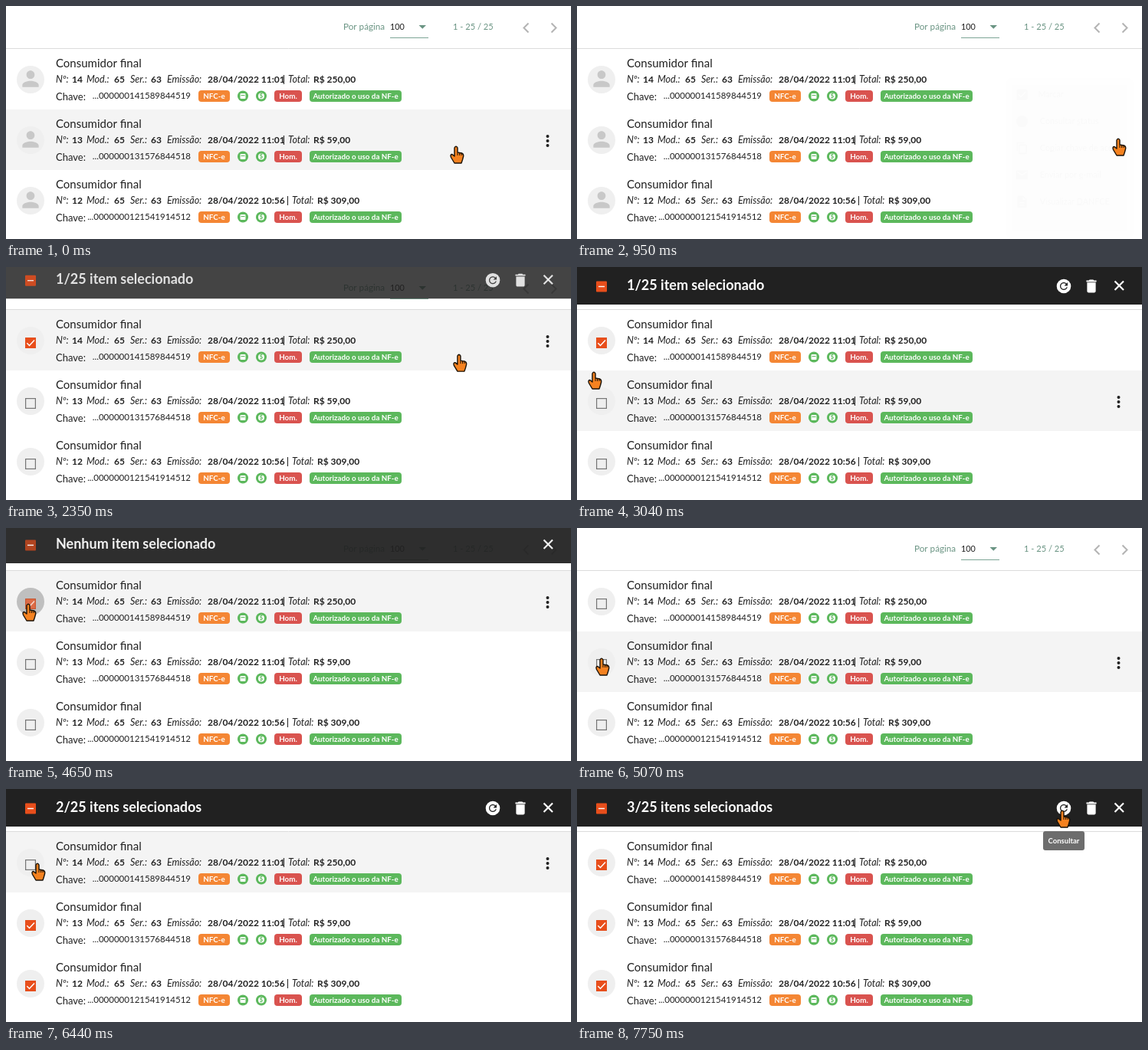
Recreate the animation shown at these times as an HTML page with a canvas. Size 737 by 304 pixels, loop 9070 ms.

```html
<!DOCTYPE html>
<html lang="pt-BR">
<head>
<meta charset="utf-8">
<style>
html, body { margin: 0; width: 100%; height: 100%; overflow: hidden; background: #fff; }
canvas { display: block; }
</style>
</head>
<body>
<canvas id="stage" width="737" height="304"></canvas>
<script>
const ctx = document.getElementById('stage').getContext('2d');
const LOOP = 9070, PITCH = 79;
const ORANGE = '#e84e1b', GREEN = '#5cb85c', INK = '#212121';

const rows = [
  { no: '14', date: '28/04/2022 11:01', total: 'R$ 250,00', key: '...000000141589844519', shift: 0 },
  { no: '13', date: '28/04/2022 11:01', total: 'R$ 59,00', key: '...000000131576844518', shift: 0 },
  { no: '12', date: '28/04/2022 10:56', total: 'R$ 309,00', key: '...0000000121541914512', shift: 5 }
];

// Each toggle: time, row, new value
const toggles = [[2200, 0, 1], [4520, 0, 0], [5130, 1, 1], [5760, 2, 1], [6650, 0, 1]];

// Pointer tip: time, x, y
const track = [
  [330, 587, 183], [750, 706, 173], [1250, 706, 173], [1620, 650, 108], [2200, 644, 112],
  [3040, 22, 137], [3110, 22, 137], [3590, 30, 98], [3910, 30, 98], [3920, 29, 99],
  [4660, 29, 99], [4980, 32, 170], [5190, 32, 170], [5480, 33, 236], [5640, 32, 250],
  [5850, 32, 250], [6440, 41, 97], [6560, 34, 97], [6740, 34, 97], [7330, 594, 30], [7600, 633, 28]
];

const icons = {
  person: 'M12 12c2.21 0 4-1.79 4-4s-1.79-4-4-4-4 1.79-4 4 1.79 4 4 4zm0 2c-2.67 0-8 1.34-8 4v2h16v-2c0-2.66-5.33-4-8-4z',
  refresh: 'M17.65 6.35C16.2 4.9 14.21 4 12 4c-4.42 0-7.99 3.58-7.99 8s3.57 8 7.99 8c3.73 0 6.84-2.55 7.73-6h-2.08c-.82 2.33-3.04 4-5.65 4-3.31 0-6-2.69-6-6s2.69-6 6-6c1.66 0 3.14.69 4.22 1.78L13 11h7V4z',
  trash: 'M6 19c0 1.1.9 2 2 2h8c1.1 0 2-.9 2-2V7H6zM19 4h-3.5l-1-1h-5l-1 1H5v2h14z',
  check: 'M19 3H5c-1.1 0-2 .9-2 2v14c0 1.1.9 2 2 2h14c1.1 0 2-.9 2-2V5c0-1.1-.9-2-2-2zm-9 14l-5-5 1.41-1.41L10 14.17l7.59-7.59L19 8z',
  copy: 'M16 1H4c-1.1 0-2 .9-2 2v14h2V3h12zm3 4H8c-1.1 0-2 .9-2 2v14c0 1.1.9 2 2 2h11c1.1 0 2-.9 2-2V7c0-1.1-.9-2-2-2zm0 16H8V7h11z',
  mail: 'M20 4H4c-1.1 0-2 .9-2 2v12c0 1.1.9 2 2 2h16c1.1 0 2-.9 2-2V6c0-1.1-.9-2-2-2zm0 4l-8 5-8-5V6l8 5 8-5z',
  file: 'M14 2H6c-1.1 0-2 .9-2 2v16c0 1.1.9 2 2 2h12c1.1 0 2-.9 2-2V8zm-1 7V3.5L18.5 9zM8 13v2h8v-2zm0 4v2h8v-2z',
  hand: 'M-2 2Q0-1.8 2 2V8L7.5 9Q10 10 9.7 13L8.5 17.5 7 22H-2L-6.5 14.5Q-8 10.5-5 10.5L-2 13Z'
};
for (const name in icons) icons[name] = new Path2D(icons[name]);

const menuItems = [
  ['check', 'Marcar', ''], ['refresh', 'Consultar status', 's', 10], ['copy', 'Copiar chave de acesso', 'p', 2],
  ['mail', 'Enviar por e-mail', 'e', 11], ['file', 'Visualizar DANFCE', 'D', 11]
];

const clamp = v => Math.max(0, Math.min(1, v));
const span = (t, start, length) => clamp((t - start) / length);
const easeOut = u => 1 - (1 - u) ** 3;

function text(str, x, y, size, color = INK, style = '', align = 'left') {
  ctx.font = `${style} ${size}px Lato, sans-serif`;
  ctx.fillStyle = color;
  ctx.textAlign = align;
  ctx.fillText(str, x, y);
}
function box(x, y, w, h, color, radius = 0) {
  ctx.fillStyle = color;
  ctx.beginPath();
  ctx.roundRect(x, y, w, h, radius);
  ctx.fill();
}
function disc(x, y, r, color) {
  ctx.fillStyle = color;
  ctx.beginPath();
  ctx.arc(x, y, r, 0, 7);
  ctx.fill();
}
function line(color, width, ...points) {
  ctx.strokeStyle = color;
  ctx.lineWidth = width;
  ctx.beginPath();
  for (let i = 0; i < points.length; i += 2) ctx.lineTo(points[i], points[i + 1]);
  ctx.stroke();
}
function icon(name, cx, cy, size, color) {
  ctx.save();
  ctx.translate(cx - size / 2, cy - size / 2);
  ctx.scale(size / 24, size / 24);
  ctx.fillStyle = color;
  ctx.fill(icons[name], 'evenodd');
  ctx.restore();
}
function faded(alpha, draw) {
  if (alpha <= 0) return;
  ctx.save();
  ctx.globalAlpha *= alpha;
  draw();
  ctx.restore();
}

function pointerAt(t) {
  const next = track.findIndex(k => k[0] > t);
  if (next === 0) return track[0].slice(1);
  if (next < 0) return track.at(-1).slice(1);
  const [t0, x0, y0] = track[next - 1], [t1, x1, y1] = track[next];
  const u = span(t, t0, t1 - t0), s = u * u * (3 - 2 * u);
  return [x0 + (x1 - x0) * s, y0 + (y1 - y0) * s];
}
function lastToggle(t, row) {
  return toggles.findLast(k => k[0] <= t && k[1] === row);
}
function checkedAmount(t, row) {
  const last = lastToggle(t, row);
  if (!last) return 0;
  return last[2] ? span(t, last[0], 120) : 1 - span(t, last[0], 300) ** 1.6;
}
function barAmount(t) {
  if (t < 4520) return easeOut(span(t, 2200, 330));
  if (t < 5130) return 1 - span(t, 4520, 330) ** 3;
  return easeOut(span(t, 5130, 450));
}

function paginator() {
  const green = '#6a9483';
  text('Por página', 440, 31, 11.7, green);
  text('100', 501, 31, 10.8, INK);
  line('#7da596', 1, 501, 41.5, 551, 41.5);
  ctx.fillStyle = green;
  ctx.fill(new Path2D('M538.5 25h9.5l-4.75 4.8z'));
  text('1 - 25 / 25', 583, 31, 11.1, green);
  line('#b4b4b4', 2, 681.5, 22.5, 675.5, 28.5, 681.5, 34.5);
  line('#b4b4b4', 2, 711.5, 22.5, 717.5, 28.5, 711.5, 34.5);
  line('#dcdcdc', 1, 0, 55.5, 737, 55.5);
}

function badge(label, x, width, color) {
  box(x, 110, width, 15, color, 4);
  text(label, x + width / 2, 121, 9.8, '#fff', 'bold', 'center');
}

function avatar(t, row) {
  disc(32, 96, 18, '#efefef');
  if (t < 2200) return icon('person', 32, 95, 32, '#c8c8c8');
  const last = lastToggle(t, row);
  if (last && last[0] > 2200) {
    const age = t - last[0];
    faded(0.2 * (1 - span(age, 130, 250)), () => disc(32, 96, 18 * easeOut(span(age, 0, 130)), '#000'));
  }
  ctx.strokeStyle = '#757575';
  ctx.lineWidth = 1.2;
  ctx.strokeRect(25.6, 92.6, 12.8, 12.8);
  faded(checkedAmount(t, row), () => {
    box(25, 92, 14, 14, ORANGE, 1);
    line('#fff', 1.5, 27.3, 99.3, 30.5, 102.5, 37, 95.5);
  });
}

function drawRow(t, row, hovered) {
  const { no, date, total, key, shift } = rows[row];
  ctx.save();
  ctx.translate(0, row * PITCH);
  if (hovered) box(0, 56, 737, 79, '#f4f4f4');
  avatar(t, row);
  text('Consumidor final', 65, 80, 15);
  for (const [label, x] of [['Nº:', 65], ['Mod.:', 105], ['Ser.:', 162], ['Emissão:', 210], ['Total:', 368 + shift]])
    text(label, x, 100, 12.5, INK, 'italic');
  for (const [value, x] of [[no, 86], ['65', 141], ['63', 189], [date, 263], [total, 401 + shift]])
    text(value, x, 100, 12, INK, 'bold');
  line(INK, 1, 362.5 + shift, 90, 362.5 + shift, 102);
  text('Chave:', 65, 123, 13);
  text(key, 241, 121, 11.5, INK, '', 'right');
  badge('NFC-e', 251, 41, '#f48634');
  disc(309, 117.5, 7, GREEN);
  box(305.5, 114, 7, 7, '#fff', 1);
  box(306.5, 116, 5, 1, GREEN);
  disc(333, 117.5, 7, GREEN);
  disc(333, 117.5, 4, '#fff');
  text('$', 333, 120.3, 7.5, GREEN, 'bold', 'center');
  badge('Hom.', 350, 36, '#d9534f');
  badge('Autorizado o uso da NF-e', 396, 120, GREEN);
  if (hovered) for (const y of [91, 97, 103]) disc(706.5, y, 2, INK);
  ctx.restore();
}

function drawBar(t) {
  const amount = barAmount(t);
  const count = rows.filter((_, row) => lastToggle(t, row)?.[2]).length;
  const plural = count > 1 ? 'itens selecionados' : 'item selecionado';
  faded(amount, () => {
    ctx.translate(0, -49 * (1 - amount));
    box(0, 0, 737, 49, INK);
    faded(count ? 1 : 0.75, () => box(25, 18.5, 14, 14, ORANGE, 1));
    line('#fff', 1.4, 28, 25.5, 36, 25.5);
    text(count ? `${count}/25 ${plural}` : 'Nenhum item selecionado', 65, 30, 18, '#fff', 'bold');
    if (count) {
      disc(635, 25, 9.3, '#fff');
      icon('refresh', 635, 25, 15, INK);
      icon('trash', 671, 25, 22.5, '#fff');
    }
    line('#fff', 2.2, 701.5, 18.5, 713, 30);
    line('#fff', 2.2, 701.5, 30, 713, 18.5);
  });
}

function drawMenu(t, x, y) {
  const opening = easeOut(span(t, 950, 150));
  faded(opening * (1 - span(t, 2180, 120)), () => {
    ctx.translate(726, 92);
    ctx.scale(0.8 + 0.2 * opening, 0.8 + 0.2 * opening);
    ctx.translate(-726, -92);
    ctx.save();
    ctx.shadowColor = 'rgba(0,0,0,.35)';
    ctx.shadowBlur = 7;
    ctx.shadowOffsetY = 2;
    box(519, 92, 207, 260, '#fff', 3);
    ctx.restore();
    menuItems.forEach(([name, label, letter, at], i) => {
      const top = 98 + i * 43.4, hovered = x > 519 && y > top && y < top + 43.4;
      if (hovered) box(519, top, 207, 43.4, '#f4f4f4');
      const mid = 121.5 + i * 43.4, left = i ? 574 : 571;
      if (name === 'refresh') {
        disc(545, mid, 9.5, '#666');
        icon(name, 545, mid, 16, '#fff');
      } else icon(name, 545, mid, name === 'copy' ? 21 : 23, '#666');
      text(label, left, mid + 4, 13.4);
      if (letter) {
        const start = left + ctx.measureText(label.slice(0, at)).width;
        line(INK, 1, start, Math.round(mid) + 5.5, start + ctx.measureText(letter).width, Math.round(mid) + 5.5);
      }
    });
  });
}

function drawPointer(x, y) {
  ctx.save();
  ctx.translate(x, y);
  ctx.fillStyle = '#f58220';
  ctx.strokeStyle = '#1a1208';
  ctx.lineWidth = 1.4;
  ctx.lineJoin = 'round';
  ctx.fill(icons.hand);
  ctx.stroke(icons.hand);
  for (const k of [2, 4.6, 7]) line('#1a1208', 1, k, 8.5, k, 12);
  ctx.restore();
}

function draw(t) {
  const [x, y] = pointerAt(t);
  const menuOpen = t > 950 && t < 2250;
  const hoveredRow = menuOpen || y < 56 ? -1 : Math.floor((y - 56) / PITCH);
  ctx.clearRect(0, 0, 737, 304);
  box(0, 0, 737, 304, '#fff');
  rows.forEach((_, row) => drawRow(t, row, row === hoveredRow));
  paginator();
  drawBar(t);
  drawMenu(t, x, y);
  faded(span(t, 7500, 200), () => {
    box(608, 55, 54, 25, '#6d6d6d', 3);
    text('Consultar', 635, 70.5, 9.5, '#fff', 'bold', 'center');
  });
  drawPointer(x, y);
}

function tick() {
  draw(performance.now() % LOOP);
  requestAnimationFrame(tick);
}
tick();
</script>
</body>
</html>
```
